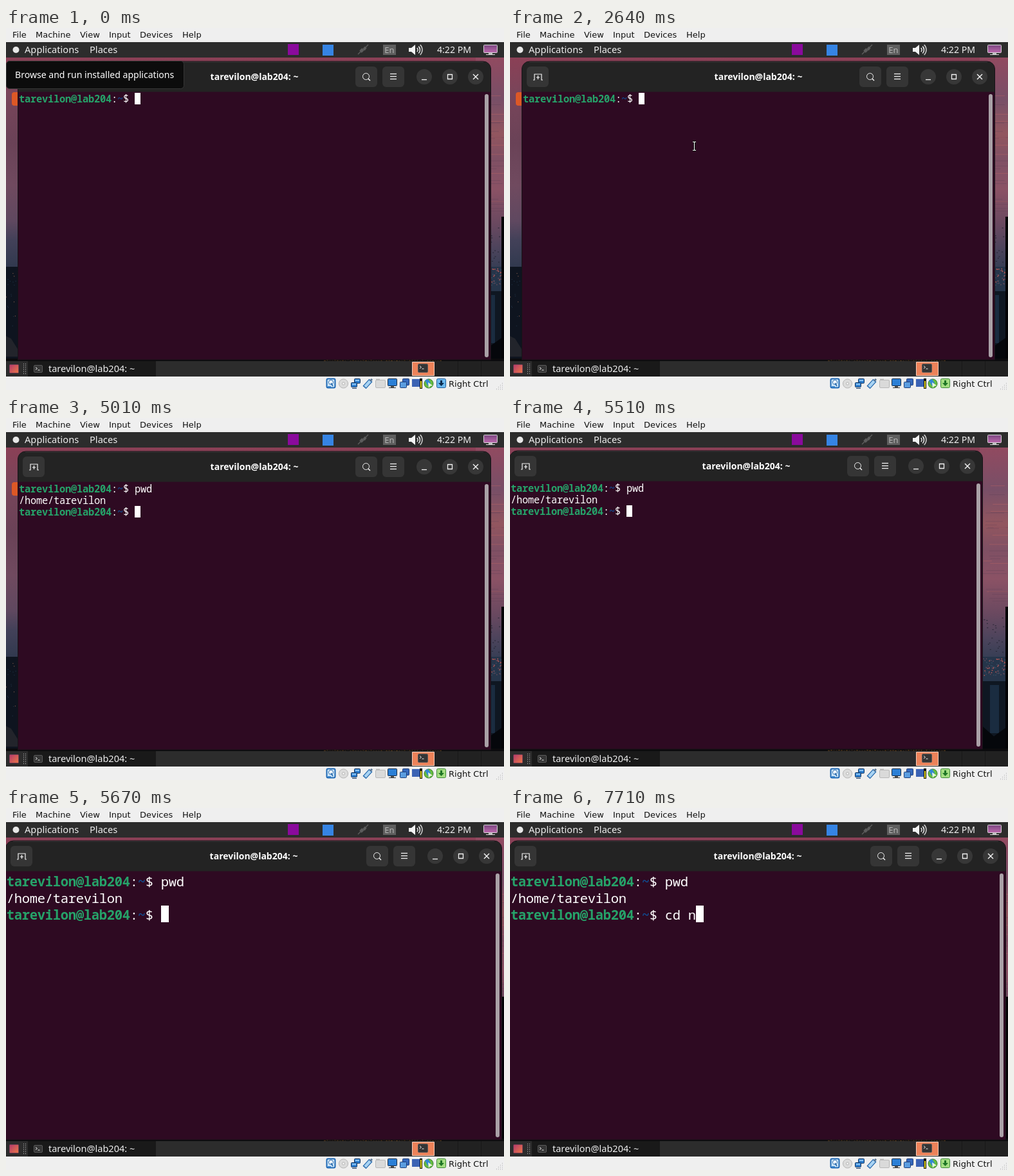
Recreate the animation shown at these times as an HTML page with a canvas. Size 774x564 px, loop 8000 ms.

```html
<!DOCTYPE html>
<html lang="en">
<head>
<meta charset="utf-8">
<title>Terminal session</title>
<style>
html, body { margin: 0; width: 100%; height: 100%; overflow: hidden; background: #efefef; }
canvas { display: block; width: 774px; height: 564px; }
</style>
</head>
<body>
<canvas id="stage" width="774" height="564"></canvas>
<script>
const ctx = document.getElementById('stage').getContext('2d');
const LOOP = 8000;
const UI = '"Noto Sans", sans-serif';
const HOST = '"DejaVu Sans", sans-serif';
const MONO = '"Noto Sans Mono", monospace';
const USER = 'tarevilon', MACHINE = USER + '@lab204', TITLE = MACHINE + ': ~';

function rect(x, y, w, h, color) {
  ctx.fillStyle = color;
  ctx.fillRect(x, y, w, h);
}
function box(x, y, w, h, r, fill, stroke, width = 1) {
  ctx.beginPath();
  ctx.roundRect(x, y, w, h, r);
  if (fill) { ctx.fillStyle = fill; ctx.fill(); }
  if (stroke) { ctx.strokeStyle = stroke; ctx.lineWidth = width; ctx.stroke(); }
}
function disc(x, y, r, fill, stroke) {
  ctx.beginPath();
  ctx.arc(x, y, r, 0, Math.PI * 2);
  if (fill) { ctx.fillStyle = fill; ctx.fill(); }
  if (stroke) { ctx.strokeStyle = stroke; ctx.lineWidth = 1; ctx.stroke(); }
}
function line(color, width, ...p) {
  ctx.beginPath();
  ctx.moveTo(p[0], p[1]);
  for (let i = 2; i < p.length; i += 2) ctx.lineTo(p[i], p[i + 1]);
  ctx.strokeStyle = color;
  ctx.lineWidth = width;
  ctx.stroke();
}
function poly(color, ...p) {
  ctx.beginPath();
  for (let i = 0; i < p.length; i += 2) ctx.lineTo(p[i], p[i + 1]);
  ctx.closePath();
  ctx.fillStyle = color;
  ctx.fill();
}
function text(s, x, y, font, color, align = 'left') {
  ctx.font = font;
  ctx.fillStyle = color;
  ctx.textAlign = align;
  ctx.fillText(s, x, y);
}
function fade(y0, y1, stops) {
  const g = ctx.createLinearGradient(0, y0, 0, y1);
  stops.forEach(([at, c]) => g.addColorStop(at, c));
  return g;
}
function random(seed) {
  return () => (seed = (seed * 16807) % 2147483647) / 2147483647;
}

function wallpaper() {
  const rnd = random(71);
  rect(0, 46, 774, 473, fade(46, 519, [[0, '#8b4056'], [.12, '#79455a'], [.28, '#6a4257'],
    [.42, '#704a5f'], [.54, '#5f4860'], [.6, '#434159'], [.68, '#333a50'], [1, '#10151f']]));
  rect(730, 46, 44, 330, fade(46, 376, [[0, '#914a60'], [.2, '#784f67'], [.36, '#92565f'],
    [.48, '#7f5064'], [.62, '#8b5265'], [.78, '#6b4960'], [.9, '#4d445c'], [1, '#353e54']]));
  for (let i = 0; i < 26; i++) {
    const y = 105 + rnd() * 180, w = 12 + rnd() * 30;
    rect(734 + rnd() * 20, y, w, 1, i % 3 ? 'rgba(88,62,84,.3)' : 'rgba(196,104,100,.4)');
  }
  // distant skyline and lit windows
  rect(730, 372, 44, 38, '#26354a');
  for (let i = 0; i < 75; i++) {
    rect(735 + rnd() * 35, 374 + rnd() * 28, 1.5, 1.5, ['#c05a55', '#694b5c', '#375064'][i % 3]);
  }
  for (let i = 0; i < 22; i++) rect(735 + rnd() * 32, 310 + rnd() * 60, 2, 1, '#242533');
  rect(730, 410, 44, 109, '#0f1722');
  rect(746, 416, 14, 75, '#1a2c40');
  poly('#05070b', 734, 480, 752, 496, 774, 480, 774, 519, 734, 519);
  rect(0, 372, 19, 147, '#0e141f');
  for (let i = 0; i < 18; i++) rect(rnd() * 18, 376 + rnd() * 90, 1, 1, i % 4 ? '#253b50' : '#a8715a');
  poly('#22242b', 0, 480, 8, 484, 18, 500, 18, 512, 0, 512);
  rect(770, 294, 4, 225, '#030305');
  rect(0, 515, 774, 4, '#0b0b0d');
  for (let x = 494; x < 678; x += 4) rect(x, 517 + rnd(), 3, 1, rnd() < .5 ? '#60401f' : '#34271c');
  box(9, 100, 22, 21, 4, '#dd5826');
}

function termIcon(x, y, w, h) {
  box(x, y, w, h, 1.5, '#353535', '#5a5a5a');
  line('#eee', 1, x + 2.5, y + 3, x + 5, y + 5, x + 2.5, y + 7);
  line('#eee', 1, x + 6, y + 7.5, x + 9, y + 7.5);
}

function topBars() {
  rect(0, 0, 774, 22, '#efefef');
  [['File', 10], ['Machine', 46], ['View', 115], ['Input', 160], ['Devices', 208], ['Help', 274]]
    .forEach(([s, x]) => text(s, x, 15, '13px ' + HOST, '#111'));
  rect(0, 22, 774, 24, '#2c2c2c');
  disc(15.5, 34, 5, '#e8e8e8');
  text('Applications', 29, 39, '14.67px ' + UI, '#eee');
  text('Places', 130, 39, '14.67px ' + UI, '#eee');
  rect(438, 25, 17, 17, '#8a0a9c');
  rect(492, 26, 17, 17, '#3584e4');
  // disconnected plug
  line('#5c5c5c', 1.5, 547, 41, 552, 36);
  line('#5c5c5c', 1.5, 557, 32, 563, 26);
  line('#5c5c5c', 5, 551, 37, 555, 33);
  line('#5c5c5c', 4, 556, 34, 559, 30);
  rect(586, 26, 20, 16, '#5f5f5f');
  text('En', 596, 39, '13px ' + UI, '#b4b4b4', 'center');
  poly('#f2f2f2', 626, 31, 630, 31, 636, 26, 636, 42, 630, 37, 626, 37);
  ctx.lineWidth = 1.5;
  [4, 7.5, 11].forEach((r, i) => {
    ctx.beginPath();
    ctx.arc(636, 34, r, -.8, .8);
    ctx.strokeStyle = i < 2 ? '#f2f2f2' : '#ccc';
    ctx.stroke();
  });
  text('4:22 PM', 670, 39, '14.1px ' + UI, '#eee');
  box(742.5, 26.5, 21, 12, 1, fade(26, 39, [[0, '#79457f'], [1, '#c06bb0']]), '#d5d5d5');
  rect(750, 39, 6, 2, '#bbb');
  rect(746, 41, 14, 1, '#ddd');
}

function taskbar() {
  rect(0, 519, 774, 24, '#2c2c2c');
  const g = ctx.createLinearGradient(5, 524, 20, 538);
  g.addColorStop(0, '#b2386c');
  g.addColorStop(1, '#ee7a46');
  box(5.5, 524.5, 14, 13, 1, g, '#7b3d56');
  for (let y = 523; y < 540; y += 3) {
    rect(27, y, 1, 1, '#c4c4c4');
    rect(30, y, 1, 1, '#c4c4c4');
  }
  rect(34, 519, 199, 24, '#191919');
  termIcon(43.5, 525.5, 13, 11);
  text(TITLE, 66, 536, '14.5px ' + UI, '#eee');
  rect(666, 519, 108, 24, '#212121');
  rect(702, 519, 1, 24, '#181818');
  rect(738, 519, 1, 24, '#181818');
  box(631.5, 520.5, 34, 21, 0, '#ec8259', '#f8d0bd');
  termIcon(640.5, 523.5, 15, 13);
}

function monitor(x, y, w, h) {
  box(x, y, w, h, 1, '#2f7fd0', '#17365f');
  rect(x + 1.5, y + 1.5, w - 3, 2, '#8cc4f2');
}

function statusBar(t) {
  rect(0, 543, 774, 21, '#efefef');
  box(498.5, 546.5, 13, 14, 2, '#cfe6f8', '#1f68b4', 2);
  disc(505, 552, 3.5, '#fff', '#2568ad');
  line('#2568ad', 1.5, 505, 553, 508, 558);
  rect(500, 558, 5, 2, '#3d87cf');
  disc(524.5, 554, 7, '#dcdcdc', '#b5b5b5');
  disc(524.5, 554, 2, '#f5f5f5', '#b5b5b5');
  monitor(541.5, 546.5, 9, 7);
  monitor(536.5, 552.5, 9, 7);
  rect(538, 561, 7, 1, '#17365f');
  line('#2568ad', 7, 557, 560, 567, 549);
  line('#a9d3f3', 4.5, 558, 559, 566, 550);
  line('#5a7896', 3, 566, 550, 569, 547);
  box(574.5, 548.5, 15, 12, 1.5, '#dadada', '#b9b9b9');
  line('#b9b9b9', 1.5, 575, 547.5, 581, 547.5);
  box(593.5, 546.5, 14, 11, 1, '#2b7fd6', '#1b2c44');
  rect(598, 558, 5, 2, '#555');
  rect(595, 560, 11, 1, '#333');
  box(616.5, 546.5, 10, 10, 1, '#3568bd', '#1d3c78');
  box(612.5, 551.5, 10, 9, 1, '#5b9de0', '#1d3c78');
  rect(631, 547, 12, 12, '#3b62b4');
  // load meter
  rect(643, 546, 4, 16, '#14140a');
  rect(644, 550, 2, 11, '#e2d51f');
  const flips = [990, 2640, 3630, 4600, 5590, 6650].filter(at => t >= at).length;
  if (flips % 2) rect(644, 548, 2, 2, '#e2d51f');
  disc(657, 554, 7, '#67bd40', '#337b30');
  poly('#3487d4', 651, 549, 656, 547, 660, 553, 656, 558);
  poly('#e9f6dd', 656, 552, 663, 557, 659, 558, 657, 561);
  const held = t >= 750;
  box(669.5, 546.5, 14, 14, 2, held ? '#a4dd82' : '#6bb8ee', held ? '#3d8a38' : '#1f5c9b');
  const arrow = held ? '#1e7526' : '#0b2c50';
  rect(675, 549, 3, 4, arrow);
  poly(arrow, 672, 553, 681, 553, 676.5, 558);
  text('Right Ctrl', 688, 559, '13px ' + HOST, '#111');
  for (let i = 0; i < 4; i++)
    for (let j = 0; j <= i; j++) rect(771 - j * 3, 553 + i * 3, 1, 1, '#aaa');
}

function headerButtons(l, r, y) {
  const cy = y + 24, ink = '#f2f2f2';
  [l + 24, r - 194, r - 152].forEach(x => box(x - 17, cy - 16, 34, 32, 6, '#353535'));
  const x = l + 24;
  line(ink, 1.2, x - 7, cy + 5, x - 5, cy + 5, x - 5, cy - 4, x + 6, cy - 4, x + 6, cy + 5, x + 8, cy + 5);
  line(ink, 1.2, x - 2, cy + 1, x + 3, cy + 1);
  line(ink, 1.2, x + .5, cy - 2, x + .5, cy + 4);
  disc(r - 194.5, cy - .5, 5, null, ink);
  line(ink, 1.5, r - 191, cy + 3, r - 188, cy + 6);
  [-4.5, -.5, 3.5].forEach(d => line(ink, 1.3, r - 157, cy + d, r - 147, cy + d));
  [104, 64, 24].forEach(d => disc(r - d, cy, 12, '#373737'));
  line(ink, 1.3, r - 108, cy + 4.5, r - 100, cy + 4.5);
  box(r - 67.5, cy - 3.5, 7, 7, 0, null, ink, 1.3);
  line(ink, 1.4, r - 28, cy - 4, r - 20, cy + 4);
  line(ink, 1.4, r - 20, cy - 4, r - 28, cy + 4);
}

// Window shape and character cell at time t
function layout(t) {
  if (t < 5510) return { l: 19, r: 754, y: 52, b: 517, cw: 9, ch: 18 };
  if (t < 5590) return { l: 0, r: 735, y: 51, b: 516, cw: 9, ch: 18 };
  if (t < 5670) return { l: 0, r: 775, y: 51, b: 519, cw: 10, ch: 22 };
  return { l: 0, r: 771, y: 51, b: 517, cw: 12, ch: 26 };
}

function typed(t) {
  if (t < 3390) return '';
  if (t < 3470) return 'p';
  if (t < 3630) return 'pw';
  if (t < 3870) return 'pwd';
  if (t < 7550) return '';
  return t < 7710 ? 'cd' : 'cd n';
}

function caretShown(t) {
  return ![[4450, 5010], [5910, 6570], [7140, 7550]].some(([a, b]) => t >= a && t < b);
}

function terminal(t) {
  const { l, r, y, b, cw, ch } = layout(t);
  box(l - .5, y, r - l, b - y, [12, 12, 0, 0], '#2e0a22', '#171317');
  box(l, y + .5, r - l - 1, 47, [11, 11, 0, 0], '#232323');
  line('#393939', 1, l + 11, y + 1, r - 12, y + 1);
  text(TITLE, (l + r) / 2 - .5, y + 29, 'bold 14px ' + UI, '#fff', 'center');
  headerButtons(l, r, y);
  box(r - 10, y + 51, 6, b - y - 55, 3, '#aaa1a7');

  const top = y + 49, size = cw * 1.71;
  let col = 0, row = 0;
  function put(s, color, weight = '') {
    for (const c of s) {
      text(c, l + 1 + (col++ + .5) * cw, top + row * ch + Math.round(ch * .83),
        `${weight} ${size}px ${MONO}`, color, 'center');
    }
  }
  function prompt() {
    put(MACHINE, '#26a269', 'bold');
    put(':', '#fff');
    put('~', '#12488b', 'bold');
    put('$ ', '#fff');
  }
  prompt();
  if (t >= 3870) {
    put('pwd', '#fff');
    col = 0; row = 1;
    put('/home/' + USER, '#fff');
    col = 0; row = 2;
    prompt();
  }
  put(typed(t), '#fff');
  if (caretShown(t)) rect(l + 1 + col * cw, top + row * ch, cw, ch, '#fff');
}

function pointer(t) {
  if (t < 750 || t >= 3390) return;
  const step = Math.min(4, Math.floor((t - 750) / 80)) / 4;
  const k = 1 - (1 - step) ** 2;
  const x = Math.round(215 + 71 * k) + .5, y = Math.round(112 + 72 * k);
  [['#111', 3], ['#fff', 1]].forEach(([color, w]) => {
    line(color, w, x, y - 6, x, y + 6);
    line(color, w, x - 2.5, y - 6.5, x + 2.5, y - 6.5);
    line(color, w, x - 2.5, y + 6.5, x + 2.5, y + 6.5);
  });
}

function tooltip() {
  box(.5, 51.5, 276, 43, 5, '#0c0c0c', '#363636');
  text('Browse and run installed applications', 14, 78, '14.07px ' + UI, '#fff');
}

function draw(t) {
  wallpaper();
  terminal(t);
  pointer(t);
  if (t < 750) tooltip();
  topBars();
  taskbar();
  statusBar(t);
}

const start = performance.now();
function tick() {
  draw((performance.now() - start) % LOOP);
  requestAnimationFrame(tick);
}
tick();
</script>
</body>
</html>
```
